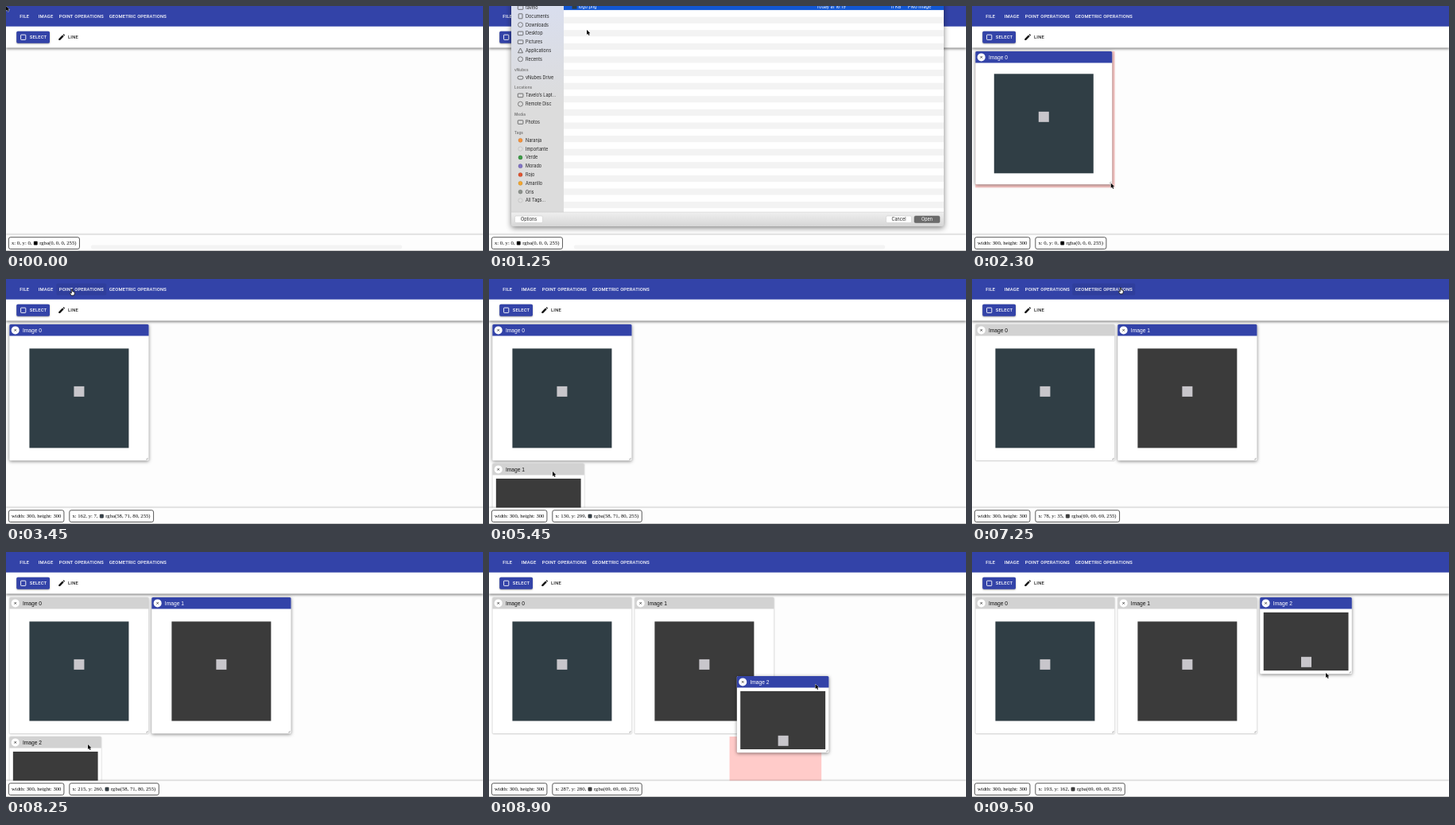
These frames come from a looping animation (600 by 308 pixels, 9.55 s). An HTML page with a canvas:

```html
<!DOCTYPE html>
<html lang="en">
<head>
<meta charset="utf-8">
<title>Image editor demo</title>
<style>
html, body { margin: 0; width: 100%; height: 100%; overflow: hidden; background: #fdfdfd; }
canvas { display: block; }
</style>
</head>
<body>
<canvas id="stage" width="600" height="308"></canvas>
<script>
const ctx = document.getElementById('stage').getContext('2d');
const LOOP = 9550, STEP = 50, BLUE = '#3343a8';
const ROBOTO = 'Roboto, sans-serif', SANS = '"Liberation Sans", Arial, sans-serif';
const SERIF = '"Liberation Serif", Times, serif', INTER = 'Inter, sans-serif';
const LEFT = 4.3, TOP = 57, COL = 59.65, ROW = 25, GAP = 3.7, BAR = 14.5, PAD = 4.3, PIC = 125;
const MENU_TOP = 7.5, ITEM = 15, MENU_PAD = 3.3;

const clamp = v => Math.max(0, Math.min(1, v));
const progress = (t, from, to) => clamp((t - from) / (to - from));
const smooth = p => p * p * (3 - 2 * p);
const mix = (a, b, p) => a + (b - a) * p;

function rect(x, y, w, h, fill) {
  ctx.fillStyle = fill;
  ctx.fillRect(x, y, w, h);
}
function round(x, y, w, h, r, fill, stroke, line = 0.8) {
  ctx.beginPath();
  ctx.roundRect(x, y, w, h, r);
  paint(fill, stroke, line);
}
function circle(x, y, r, fill, stroke, line = 0.7) {
  ctx.beginPath();
  ctx.arc(x, y, r, 0, 7);
  paint(fill, stroke, line);
}
function path(points, fill, stroke, line = 0.8) {
  ctx.beginPath();
  points.forEach(([x, y]) => ctx.lineTo(x, y));
  ctx.closePath();
  paint(fill, stroke, line);
}
function paint(fill, stroke, line) {
  if (fill) { ctx.fillStyle = fill; ctx.fill(); }
  if (stroke) { ctx.strokeStyle = stroke; ctx.lineWidth = line; ctx.stroke(); }
}
function setFont(size, family, weight = 400, spacing = 0) {
  ctx.font = `${weight} ${size}px ${family}`;
  ctx.letterSpacing = spacing + 'px';
}
function text(str, x, y, size, family, color, weight, spacing) {
  setFont(size, family, weight, spacing);
  ctx.fillStyle = color;
  ctx.fillText(str, x, y);
}
function shadowed(blur, dy, color, draw) {
  ctx.save();
  ctx.shadowBlur = blur;
  ctx.shadowOffsetY = dy;
  ctx.shadowColor = color;
  draw();
  ctx.restore();
}
function fade(y0, y1, from, to) {
  const gradient = ctx.createLinearGradient(0, y0, 0, y1);
  gradient.addColorStop(0, from);
  gradient.addColorStop(1, to);
  return gradient;
}

// Layout: toolbar buttons in a row, windows on a grid
const capital = (str, x, y, color) => text(str, x, y, 5.83, ROBOTO, color, 500, 0.167);
setFont(5.83, ROBOTO, 500, 0.167);
let edge = 10;
const buttons = ['FILE', 'IMAGE', 'POINT OPERATIONS', 'GEOMETRIC OPERATIONS'].map(label => {
  const textWidth = ctx.measureText(label).width;
  const button = { label, textWidth, x: edge, w: Math.max(26.7, textWidth + 6.7) };
  edge += button.w;
  return button;
});
const menus = [
  { x: buttons[0].x, open: 100, close: 500, items: ['Open', 'Save as'] },
  { x: buttons[2].x, open: 3700, close: 4500, items: ['Grayscale', 'Linear transformation',
    'Brightness and contrast adjustment', 'Gamma correction', 'Histogram equalization',
    'Histogram specification', 'Images difference', 'Color changes'] },
  { x: buttons[3].x, open: 7300, close: 7750, items: ['Vertical mirror', 'Horizontal mirror',
    'Transpose', 'Rotate', 'Scale'] }
];
const TEAL = { fill: '#303e45', pixel: [58, 71, 80] }, GRAY = { fill: '#3b3b3b', pixel: [69, 69, 69] };
const windows = [
  { born: 1550, col: 0, resize: [2000, 2400], tone: TEAL },
  { born: 4700, col: 3, drag: [5500, 6150], resize: [6450, 6650], tone: GRAY },
  { born: 7850, col: 6, drag: [8350, 9150], tone: GRAY, turned: true }
];
const columnX = col => LEFT + col * COL;
const span = (cols, rows) => [cols * COL - GAP, rows * ROW - GAP];
const SMALL = span(2, 4), LARGE = span(3, 7);
const BELOW = TOP + 7 * ROW;

// Pointer targets
const item = (menu, i, dx) => [menu.x + dx, MENU_TOP + MENU_PAD + ITEM * (i + 0.5)];
const corner = (col, [w, h]) => [columnX(col) + w - 1.5, TOP + h - 1.5];
const pixel = (col, px, py) => [
  columnX(col) + (LARGE[0] - PIC) / 2 + px / 300 * PIC,
  TOP + BAR + (LARGE[1] - BAR - PIC) / 2 + py / 300 * PIC
];

// Pointer moves: start, end, destination
const moves = [
  [0, 0, [24, 13]], [200, 400, item(menus[0], 0, 18)], [550, 950, [123, 30]],
  [1550, 1950, corner(0, SMALL)], [2000, 2350, corner(0, LARGE)],
  [2600, 2900, pixel(0, 162, 7)], [2900, 3150, [83, 14]],
  [3750, 4200, item(menus[1], 0, 36)], [4600, 5200, pixel(0, 130, 299)], [5200, 5400, [80, 242]],
  [5500, 5850, [430, 72]], [5850, 6150, [261, 68]],
  [6200, 6400, corner(3, SMALL)], [6450, 6650, corner(3, LARGE)],
  [6750, 6950, pixel(3, 78, 35)], [6950, 7100, [187, 12]],
  [7400, 7650, item(menus[2], 3, 39)], [7800, 8250, [103, 242]],
  [8350, 8700, pixel(3, 287, 280)], [8700, 8900, [410.5, 166]], [8900, 9150, [462, 67]],
  [9200, 9450, [445, 152]]
];
function pointerAt(t) {
  const i = moves.findLastIndex(move => move[0] <= t);
  const [start, end, to] = moves[i], from = moves[Math.max(0, i - 1)][2];
  const p = smooth(progress(t, start, end));
  return { x: mix(from[0], to[0], p), y: mix(from[1], to[1], p) };
}

function place(win, t) {
  const box = { x: columnX(win.drag ? 0 : win.col), y: win.drag ? BELOW : TOP, w: SMALL[0], h: SMALL[1] };
  const pointer = pointerAt(t);
  if (win.drag && t >= win.drag[1]) {
    box.x = columnX(win.col);
    box.y = TOP;
  } else if (win.drag && t >= win.drag[0]) {
    const grab = pointerAt(win.drag[0]);
    box.x += pointer.x - grab.x;
    box.y += pointer.y - grab.y;
    const col = Math.max(0, Math.round((box.x - LEFT) / COL));
    box.ghost = [columnX(col), col >= win.col ? TOP : BELOW, ...SMALL];
  }
  if (win.resize && t >= win.resize[1]) [box.w, box.h] = LARGE;
  else if (win.resize && t >= win.resize[0]) {
    box.w = pointer.x - box.x + 1.5;
    box.h = pointer.y - box.y + 1.5;
    box.ghost = [box.x, box.y, ...span(Math.round(box.w / COL), Math.round(box.h / ROW))];
  }
  box.px = box.x + Math.max(PAD, (box.w - PIC) / 2);
  box.py = box.y + BAR + Math.max(PAD, (box.h - BAR - PIC) / 2);
  return box;
}

// The last pixel the pointer touched on any picture up to time t
function readoutAt(t) {
  for (let s = t; s >= windows[0].born; s -= STEP) {
    const pointer = pointerAt(s);
    for (const win of windows.filter(w => w.born <= s)) {
      const { x, y, w, h, px, py } = place(win, s);
      const at = [pointer.x - px, pointer.y - py].map(v => Math.round(v / PIC * 300));
      const visible = pointer.x < x + w - PAD && pointer.y < y + h - PAD;
      if (visible && at.every(v => v >= 0 && v < 300)) return { at, color: win.tone.pixel };
    }
  }
  return { at: [0, 0], color: [0, 0, 0] };
}

function drawWindow(win, index, t, active) {
  const { x, y, w, h, px, py } = place(win, t);
  shadowed(active ? 4 : 1.5, active ? 1 : 0.3, active ? 'rgba(0,0,0,.5)' : 'rgba(0,0,0,.4)',
    () => round(x, y, w, h, 1.5, '#fff'));
  round(x, y, w, BAR, [1.5, 1.5, 0, 0], active ? BLUE : '#d2d2d2');
  circle(x + 7.4, y + 7.4, 5, '#fff');
  ctx.beginPath();
  ctx.moveTo(x + 6.2, y + 6.2); ctx.lineTo(x + 8.6, y + 8.6);
  ctx.moveTo(x + 8.6, y + 6.2); ctx.lineTo(x + 6.2, y + 8.6);
  paint(null, '#222', 0.8);
  text('Image ' + index, x + 16.6, y + 9.9, 6.7, SANS, active ? '#fff' : '#111');

  ctx.save();
  ctx.beginPath();
  ctx.rect(x + PAD, y + BAR + PAD, w - 2 * PAD, h - BAR - 2 * PAD);
  ctx.clip();
  ctx.translate(px + PIC / 2, py + PIC / 2);
  rect(-PIC / 2, -PIC / 2, PIC, PIC, win.tone.fill);
  if (win.turned) ctx.rotate(-Math.PI / 2);
  rect(-6.5, -15, 13, 13, '#c8c6cb');
  ctx.restore();

  ctx.beginPath();
  ctx.moveTo(x + w - 3.5, y + h - 1.5);
  ctx.lineTo(x + w - 1.5, y + h - 1.5);
  ctx.lineTo(x + w - 1.5, y + h - 3.5);
  paint(null, '#888', 0.6);
}

function drawBars(pointer, sheetOpen) {
  shadowed(3, 1, 'rgba(0,0,0,.5)', () => rect(0, 20, 600, 32.5, '#fff'));
  rect(0, 0, 600, 25.7, BLUE);
  for (const { label, textWidth, x, w } of buttons) {
    const hover = !sheetOpen && pointer.y < 22 && pointer.x > x && pointer.x < x + w;
    if (hover) round(x, 5.5, w, 15, 1.7, 'rgba(0,0,0,.07)');
    capital(label, x + (w - textWidth) / 2, 15.1, '#fff');
  }
  shadowed(2, 0.7, 'rgba(0,0,0,.4)', () => round(13.2, 31.7, 41.8, 15, 1.7, BLUE));
  round(18.6, 36.2, 6.2, 6.2, 0.6, null, '#fff', 0.9);
  capital('SELECT', 29.8, 41.4, '#fff');
  path([[66.3, 43], [66.3, 41.3], [71, 36.6], [72.7, 38.3], [68, 43]], '#111');
  path([[71.6, 36], [72.6, 35.2], [74, 36.6], [73.2, 37.7]], '#111');
  capital('LINE', 78, 41.4, '#222');
}

function drawFooter(t) {
  const status = (str, x) => text(str, x, 300.3, 6.7, SERIF, '#000');
  const frame = (x, w) => round(x, 290.7, w, 14.8, 2.3, '#fff', '#333');
  shadowed(2, -0.5, 'rgba(0,0,0,.3)', () => rect(0, 287.5, 600, 21, '#fdfdfd'));
  rect(0, 307, 600, 1, '#c9c9c9');
  let x = 3.4;
  if (t >= windows[0].born) {
    frame(x, 69.5);
    status('width: 300, height: 300', x + 3.6);
    x = 79.8;
  } else round(107, 300.5, 391, 5, 2, '#f3f3f3');
  const { at, color } = readoutAt(t);
  const label = `x: ${at[0]}, y: ${at[1]},`, value = `rgba(${color.join(', ')}, 255)`;
  setFont(6.7, SERIF);
  const labelWidth = ctx.measureText(label).width, valueWidth = ctx.measureText(value).width;
  frame(x, labelWidth + valueWidth + 17.3);
  status(label, x + 3.6);
  round(x + labelWidth + 6.3, 296, 4.2, 4.2, 0.5, `rgb(${color})`, '#000', 0.5);
  status(value, x + labelWidth + 13.3);
}

function drawMenu({ x, open, close, items }, t, pointer) {
  if (t < open || t > close + 120) return;
  const grow = 1 - (1 - progress(t, open, open + 180)) ** 2;
  setFont(6.67, ROBOTO);
  const w = Math.max(...items.map(s => ctx.measureText(s).width)) + 13.4;
  ctx.save();
  ctx.globalAlpha = grow * (1 - progress(t, close, close + 120));
  ctx.translate(x, MENU_TOP);
  ctx.scale(mix(0.75, 1, grow), mix(0.56, 1, grow));
  shadowed(5, 2, 'rgba(0,0,0,.45)', () => round(0, 0, w, items.length * ITEM + 2 * MENU_PAD, 1.7, '#fff'));
  items.forEach((label, i) => {
    const top = MENU_PAD + i * ITEM, local = pointer.y - MENU_TOP;
    if (local >= top && local < top + ITEM) rect(0, top, w, ITEM, '#ededed');
    text(label, 6.7, top + 9.9, 6.67, ROBOTO, '#222');
  });
  ctx.restore();
}

// Sidebar entries: section titles start with '#'
const sidebar = ['#Favorites', 'tavelo', 'Documents', 'Downloads', 'Desktop', 'Pictures', 'Applications', 'Recents',
  '#vNubes', 'vNubes Drive', '#Locations', 'Tavelo\u2019s Lapt...', 'Remote Disc', '#Media', 'Photos',
  '#Tags', 'Naranja', 'Importante', 'Verde', 'Morado', 'Rojo', 'Amarillo', 'Gris', 'All Tags...'];
const tagColors = { Naranja: '#f5923a', Importante: '#dedede', Verde: '#3d9b47', Morado: '#8173c4',
  Rojo: '#e0532f', Amarillo: '#f3a72f', Gris: '#8c918c', 'All Tags...': '#dedede' };

function drawSidebar() {
  rect(28, -50, 66, 309, fade(0, 120, '#d9deee', '#dcdcdc'));
  let y = -8;
  sidebar.forEach((entry, i) => {
    const title = entry[0] === '#';
    if (i) y += title ? 12.9 : sidebar[i - 1][0] === '#' ? 9.9 : 10.8;
    if (title) return text(entry.slice(1), 32, y + 1.8, 4.7, INTER, '#777', 600);
    if (tagColors[entry]) circle(39.5, y, 2.6, tagColors[entry], 'rgba(0,0,0,.2)', 0.5);
    else if (/Down|Rec|Remote/.test(entry)) circle(39.5, y, 3, null, '#555');
    else if (/Appl/.test(entry)) path([[36.5, y + 2.8], [39.5, y - 3], [42.5, y + 2.8]], null, '#555');
    else if (/Doc/.test(entry)) round(37.2, y - 3, 4.8, 6, 0.5, null, '#555');
    else if (/vNubes/.test(entry)) round(36, y - 1.5, 7, 4, 2, null, '#555');
    else round(36.3, y - 2.3, 6.6, 4.6, 0.6, null, '#555');
    text(entry, 46, y + 2, 5.5, INTER, '#222');
  });
}

function sheetButton(label, x, w, dark) {
  round(x, 263.8, w, 8.6, 1.6, dark ? '#6b6b6b' : '#fff', dark ? '#5c5c5c' : '#c4c4c4', 0.5);
  ctx.textAlign = 'center';
  text(label, x + w / 2, 270.1, 5.5, INTER, dark ? '#fff' : '#222');
  ctx.textAlign = 'left';
}

function drawSheet(t) {
  const enter = 1 - smooth(progress(t, 600, 850));
  const leave = progress(t, 1150, 1400) ** 2.5;
  const picked = t >= 1050, line = 8.3;
  const columns = (labels, y, color) => labels.forEach((label, i) =>
    text(label, [112.5, 412, 505, 527][i], y, 5.5, INTER, color));
  ctx.save();
  ctx.translate(0, 32 - 315 * Math.max(enter, leave));
  shadowed(7, 2, 'rgba(0,0,0,.5)', () => round(28, -50, 544, 327, [0, 0, 2, 2], fade(259, 277, '#efefef', '#d6d6d6')));
  rect(94, -50, 478, 309, '#fff');
  columns(['Name', 'Date Modified', 'Size', 'Kind'], -8, '#333');
  for (let i = 0, y = 5.2 - line; y < 259; i++, y += line) {
    const fill = i === 0 && picked ? '#1257d3' : i % 2 ? '#fff' : '#f3f3f3';
    rect(94, y, 478, Math.min(line, 259 - y), fill);
  }
  rect(104.5, -2, 6, 5.5, '#303e45');
  columns(['logo.png', 'Today at 16:19', '11 KB', 'PNG image'], 2.8, picked ? '#fff' : '#222');
  drawSidebar();
  rect(28, 258.7, 544, 0.5, '#c5c5c5');
  sheetButton('Options', 32.5, 35);
  sheetButton('Cancel', 499.5, 32);
  sheetButton('Open', 535, 32, picked);
  ctx.restore();
}

const ARROW = [[0, 0], [0, 6], [1.4, 4.8], [2.5, 7.1], [3.6, 6.6], [2.5, 4.4], [4.3, 4.3]];
const HAND = [[-0.7, -1], [0.5, -1], [0.7, 1.7], [3.4, 2.4], [3.2, 5], [2.3, 6.8], [-0.8, 6.8],
  [-2.6, 3.8], [-2, 3], [-0.7, 4]];

function drawPointer({ x, y }, hand) {
  ctx.save();
  ctx.translate(x, y);
  if (hand) path(HAND, '#fff', '#111');
  else {
    path(ARROW, null, '#fff');
    path(ARROW, '#000');
  }
  ctx.restore();
}

function render(t) {
  const pointer = pointerAt(t);
  const sheetOpen = t >= 600 && t < 1400;
  const shown = windows.filter(win => t >= win.born);
  const active = shown.findLast(win => !win.drag || t >= win.drag[0]);
  rect(0, 0, 600, 308, '#fdfdfd');
  drawBars(pointer, sheetOpen);
  for (const win of shown) {
    const { ghost } = place(win, t);
    if (ghost) rect(...ghost, '#ffcbc9');
  }
  shown.forEach((win, i) => drawWindow(win, i, t, win === active));
  drawFooter(t);
  menus.forEach(menu => drawMenu(menu, t, pointer));
  if (sheetOpen) drawSheet(t);
  const overMenu = menus.some(menu => t >= menu.open && t <= menu.close);
  drawPointer(pointer, !sheetOpen && (pointer.y < 22 || overMenu));
}

const begin = performance.now();
function tick() {
  const t = (performance.now() - begin) % LOOP;
  render(Math.floor(t / STEP) * STEP);
  requestAnimationFrame(tick);
}
tick();
</script>
</body>
</html>
```
